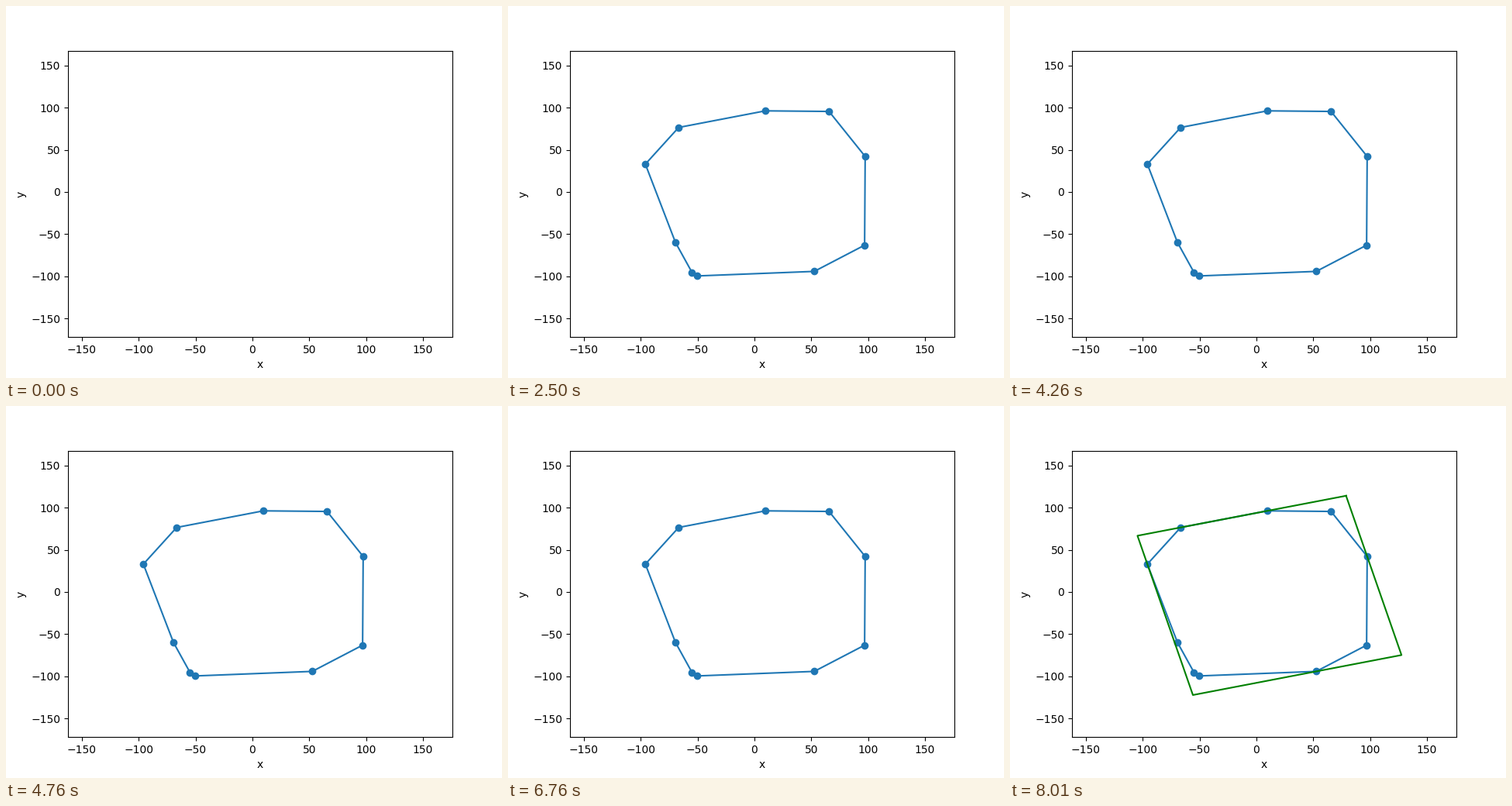
These frames come from a looping animation (640x480 px, 8.26 s). A matplotlib script:

```python
import numpy as np
import matplotlib.pyplot as plt
from matplotlib.animation import FuncAnimation

LOOP, TICK, STEP = 8260, 35, 250

# Key points: convex hull, counter-clockwise from the lowest one
HULL = np.array([
    (-50.5, -99.6), (52.7, -94.2), (97.0, -63.1), (97.5, 42.1), (65.7, 95.5),
    (9.7, 96.2), (-66.6, 76.5), (-95.9, 33.0), (-69.4, -59.9), (-54.9, -95.3),
])
N = len(HULL)
CLOSED = np.vstack([HULL, HULL[:1]])


def edge_rect(p, q):
    """Bounding rectangle with one side along p-q: closed outline and area."""
    u = (q - p) / np.hypot(*(q - p))
    axes = np.array([u, (-u[1], u[0])])
    proj = HULL @ axes.T
    (a0, b0), (a1, b1) = proj.min(axis=0), proj.max(axis=0)
    outline = np.array([(a0, b0), (a1, b0), (a1, b1), (a0, b1), (a0, b0)])
    return outline @ axes, (a1 - a0) * (b1 - b0)


RECTS, AREAS = zip(*map(edge_rect, CLOSED[:-1], CLOSED[1:]))
BEST = RECTS[np.argmin(AREAS)]

fig, ax = plt.subplots(figsize=(6.4, 4.8), dpi=100)
ax.set(xlim=(-162.2, 176.0), ylim=(-172.1, 167.6), xlabel="x", ylabel="y")
dots, = ax.plot([], [], "o", color="C0")
path, = ax.plot([], [], color="C0")
box, = ax.plot([], [], color="blue")


def draw(frame):
    t = (frame + 1) * TICK - 1
    step = (t if t < 2760 else t - 10) // STEP

    dots.set_data(*(HULL if step >= 1 else HULL[:0]).T)

    # One more hull side per step
    sides = np.clip(step - 1, 0, N)
    path.set_data(*CLOSED[:sides + 1 if sides else 0].T)

    # Each candidate rectangle blinks once, then the smallest stays
    k = step - N - 2
    done = k >= 2 * N
    outline = CLOSED[:0]
    if done:
        outline = BEST
    elif k >= 0 and k % 2 == 0:
        outline = RECTS[k // 2]
    box.set_data(*outline.T)
    box.set_color("green" if done else "blue")
    return dots, path, box


anim = FuncAnimation(fig, draw, frames=LOOP // TICK, interval=TICK,
                     repeat=True, repeat_delay=0, blit=False)
plt.show()
```
